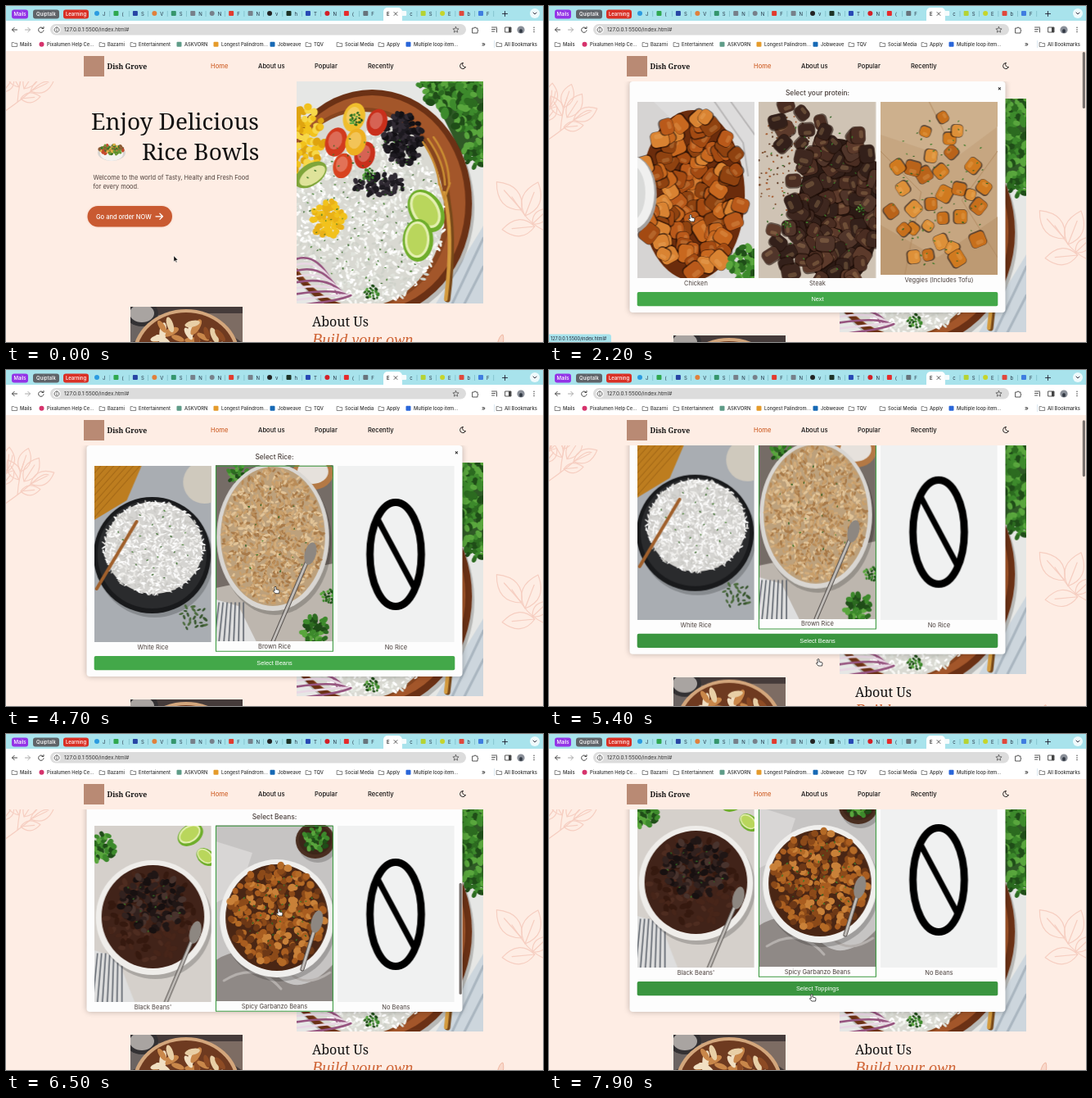
Animation of 656x410 px, one loop 8 s. Source, as an HTML page with a canvas:

```html
<!DOCTYPE html>
<html lang="en">
<head>
<meta charset="utf-8">
<title>Rice bowls</title>
<style>
html, body { margin: 0; width: 100%; height: 100%; overflow: hidden; background: #feede4 }
canvas { display: block; width: 656px; height: 410px }
</style>
</head>
<body>
<canvas id="stage"></canvas>
<script>
const W = 656, H = 410, LOOP = 8000, TAU = Math.PI * 2;
const dpr = window.devicePixelRatio || 1;
const SANS = 'Inter, sans-serif', SERIF = '"Noto Serif", serif';
const stage = document.getElementById('stage');
stage.width = W * dpr;
stage.height = H * dpr;
let g = stage.getContext('2d');

// ---- drawing helpers, all on the current context g ----
let seed = 1;
const rnd = () => (seed = seed * 16807 % 2147483647) / 2147483647;
const pick = list => list[Math.floor(rnd() * list.length)];

function rect(x, y, w, h, fill, r = 0) {
  g.fillStyle = fill;
  g.beginPath();
  g.roundRect(x, y, w, h, r);
  g.fill();
}
function oval(x, y, rx, ry, fill, turn = 0) {
  g.fillStyle = fill;
  g.beginPath();
  g.ellipse(x, y, rx, ry, turn, 0, TAU);
  g.fill();
}
function path(d, color, width, fill) {
  const p = new Path2D(d);
  if (fill) { g.fillStyle = fill; g.fill(p); }
  if (width) {
    g.strokeStyle = color;
    g.lineWidth = width;
    g.lineCap = g.lineJoin = 'round';
    g.stroke(p);
  }
}
function text(s, x, y, font, color = '#111', align = 'left') {
  g.font = font;
  g.fillStyle = color;
  g.textAlign = align;
  g.textBaseline = 'alphabetic';
  g.fillText(s, x, y);
}

// n bits spread evenly over an oval on a loose spiral; bits may be round or square
function strew(n, cx, cy, rx, ry, w, h, cols, square) {
  for (let i = 0; i < n; i++) {
    const a = i * 2.39996 + rnd() * .5, d = Math.sqrt((i + rnd()) / n), k = .8 + rnd() * .4;
    g.save();
    g.translate(cx + Math.cos(a) * d * rx, cy + Math.sin(a) * d * ry);
    g.rotate(rnd() * TAU);
    const col = pick(cols);
    if (square) {
      rect(-w * k - .8, -h * k - .4, w * k * 2 + 1.6, h * k * 2 + 2.2, '#1c0c0599', w * .6);
      rect(-w * k, -h * k, w * k * 2, h * k * 2, col, w * .55);
      rect(-w * k * .6, -h * k * .7, w * k, h * k * .6, '#ffd08a33', w * .3);
    } else oval(0, 0, w * k, h * k, col);
    g.restore();
  }
}
const herb = (x, y, r) => strew(r * 2, x, y, r, r, r * .24, r * .17, ['#3d8a2c', '#2c6b20', '#59a63d', '#1f4d18']);
const specks = (n, x, y, rx, ry) => strew(n, x, y, rx, ry, 1.3, .7, ['#3f7d2b', '#2f6322']);
function lime(x, y, r, turn) {
  oval(x, y, r, r * .72, '#6fae2b', turn);
  oval(x - 1, y - 1, r * .86, r * .58, '#e4efb0', turn);
  oval(x - 1, y - 1, r * .74, r * .46, '#b9d65c', turn);
}
function spoon(x, y, x2, y2) {
  path(`M${x} ${y}L${x2} ${y2}`, '#55504d', 5);
  path(`M${x} ${y}L${x2} ${y2}`, '#c3bfbb', 3);
  oval(x, y, 7, 14, '#8d8781', .25);
}
function napkin(y) {
  path(`M0 ${y}L28 ${y + 8}L50 216L0 216Z`, 0, 0, '#dedede');
  for (let i = 0; i < 9; i++) path(`M${i * 6 - 14} 216L${i * 5 - 6} ${y + 4}`, '#5d636c', 1.6);
}
function dish(x, y, rx, ry, rim, inner, edge) {
  oval(x + 3, y + 5, rx, ry, '#0003');
  oval(x, y, rx, ry, rim);
  oval(x, y - 1, rx - edge, ry - edge, inner);
}

// ---- pictures, painted once ----
function picture(w, h, bg, paint) {
  const c = document.createElement('canvas'), outer = g;
  c.width = Math.ceil(w * dpr);
  c.height = Math.ceil(h * dpr);
  g = c.getContext('2d');
  g.scale(dpr, dpr);
  seed = 4321;
  rect(0, 0, w, h, bg);
  paint();
  g = outer;
  return { c, w, h };
}
const put = (p, x, y) => g.drawImage(p.c, x, y, p.w, p.h);
const CW = 143.5, CH = 215;

const chicken = picture(CW, CH, '#d6d4d3', () => {
  path('M20 0L144 0L144 216L95 216L125 100Z', 0, 0, '#dddcdc');
  path('M95 0L130 50L136 90M115 0L144 40', '#b9b7b7', 2);
  oval(68, 114, 64, 104, '#6b2c0c');
  strew(95, 67, 112, 62, 99, 10, 8.5, ['#c8681f', '#a34a12', '#d98332', '#b9591a', '#8f4210'], true);
  oval(-6, 113, 30, 47, '#a5a2a0');
  oval(-7, 111, 28, 45, '#f0f0ef');
  oval(-9, 111, 19, 35, '#d9dad9');
  herb(135, 198, 22);
});
const steak = picture(CW, CH, '#cfc3b4', () => {
  strew(120, 35, 75, 45, 60, 1.2, 1, ['#7a4a2a', '#a4572a', '#5b3823']);
  const meat = ['#4a2d22', '#33201a', '#5c3a2b', '#3e271f', '#50352a'];
  strew(9, 48, 30, 36, 32, 10, 8, meat, true);
  oval(98, 135, 50, 90, '#2b1a14');
  strew(80, 96, 128, 60, 98, 10, 8.5, meat, true);
  strew(14, 45, 178, 38, 34, 10, 8, meat, true);
  specks(50, 72, 115, 70, 100);
  herb(125, 130, 5);
  herb(35, 150, 5);
});
const tofu = picture(CW, 211, '#c6a681', () => {
  path('M0 0L144 0L144 30L90 70L0 40Z', 0, 0, '#cdb08d');
  path('M0 150L70 190L144 140L144 211L0 211Z', 0, 0, '#bd9a73');
  path('M0 60L50 110L30 211M144 60L100 120L144 190M60 0L80 40', '#b28c63', 1);
  strew(31, 72, 112, 60, 98, 8, 7.4, ['#d07a1f', '#b9631a', '#dd9038', '#c76f1c'], true);
  specks(75, 72, 108, 62, 95);
});
const whiteRice = picture(CW, CH, '#a9adb2', () => {
  path('M0 0L58 0L40 42L0 66Z', 0, 0, '#bd7d1f');
  for (let i = 0; i < 8; i++) path(`M${i * 8} 0L0 ${i * 9}`, '#9b6214', 1);
  oval(135, 20, 26, 26, '#cfc9bd');
  dish(71, 109, 72, 71, '#191a1c', '#2a2b2d', 5);
  oval(73, 100, 60, 56, '#d5d4d1');
  strew(950, 73, 100, 62, 57, 2.7, .9, ['#fff', '#ecebe8', '#c9c8c4', '#f7f6f4']);
  specks(26, 74, 95, 48, 44);
  path('M3 150L52 68', '#a0602c', 4);
  strew(22, 122, 185, 18, 16, 3, 1.4, ['#4c6b3e', '#38562f']);
});
const brownRice = picture(CW, CH, '#756c66', () => {
  path('M0 150L144 120L144 216L0 216Z', 0, 0, '#bdb6ae');
  napkin(164);
  herb(28, 12, 13);
  oval(119, 10, 25, 20, '#b47945');
  oval(119, 8, 19, 15, '#e6e1dc');
  dish(70, 88, 69, 90, '#d9d6d2', '#bda17c', 5);
  strew(1000, 70, 87, 62, 82, 3.1, 1.4, ['#d2ac7b', '#b98c58', '#e2c498', '#c99f6b', '#a87a49']);
  specks(18, 70, 84, 48, 60);
  spoon(116, 108, 70, 215);
  herb(122, 201, 17);
  herb(138, 160, 9);
});
const blackBeans = picture(CW, CH, '#d5d0cb', () => {
  herb(8, 26, 18);
  lime(118, 11, 17, -.6);
  lime(137, 38, 13, .7);
  napkin(152);
  dish(72, 112, 70, 70, '#efedea', '#412319', 7);
  strew(110, 70, 110, 56, 54, 5, 3, ['#4e2c20', '#35190f', '#472519']);
  strew(100, 72, 94, 40, 36, 4.6, 3.4, ['#201615', '#32221f', '#171010', '#48332d']);
  specks(14, 68, 98, 38, 34);
  spoon(124, 130, 88, 215);
});
const garbanzo = picture(CW, CH, '#c6c4c3', () => {
  path('M0 165Q40 140 70 178T144 170L144 216L0 216Z', 0, 0, '#8f8986');
  path('M10 190Q50 165 80 200M90 180Q110 200 140 180', '#b5b0ad', 3);
  path('M0 20L45 34L30 80L0 95Z', 0, 0, '#d8d6d5');
  dish(122, 19, 24, 22, '#4a2e20', '#3c2619', 4);
  herb(122, 17, 15);
  dish(75, 114, 70, 72, '#f0efed', '#4a2614', 7);
  strew(230, 75, 110, 59, 61, 4.5, 4, ['#b46a26', '#8c4a19', '#c98139', '#6d3816', '#a95d20']);
  specks(45, 76, 105, 48, 45);
  spoon(124, 118, 106, 176);
});
const none = picture(CW, CH, '#f0f1f1', () => {
  g.strokeStyle = '#000';
  g.lineWidth = 9;
  g.beginPath();
  g.ellipse(71.5, 108, 31.5, 63.5, 0, 0, TAU);
  g.stroke();
  path('M50 66L94 148', '#000', 7);
});
const hero = picture(228, 285, '#e6e7e5', () => {
  path('M150 0L228 0L228 110L200 100Z', 0, 0, '#2f5a26');
  for (const [x, y, r] of [[185, 26, 28], [214, 60, 22], [218, 12, 20], [165, 18, 16], [220, 102, 17]]) herb(x, y, r);
  path('M228 190L170 285L228 285Z', 0, 0, '#cdd6dd');
  path('M228 205L190 285M228 240L205 285', '#aab6c0', 3);
  dish(92, 163, 122, 139, '#6b3115', '#a3562a', 8);
  oval(82, 168, 106, 122, '#87451f');
  oval(80, 170, 100, 119, '#d9d9d2');
  strew(1200, 88, 182, 92, 106, 3, 1.4, ['#fff', '#eef0ea', '#cfd2ca', '#f8f8f5', '#e0e3dc']);
  strew(75, 10, 88, 24, 45, 4.5, 4, ['#f2c21c', '#f7d84a', '#dfa40f']);
  strew(50, 38, 182, 20, 22, 4, 3.5, ['#f2c21c', '#e9b117']);
  oval(17, 128, 22, 13, '#7fa53a', -.6);
  oval(19, 129, 18, 9, '#dfe39a', -.6);
  strew(120, 130, 84, 24, 32, 4, 3.2, ['#1d1a20', '#302a33', '#121014']);
  strew(45, 100, 140, 32, 14, 4, 3, ['#1d1a20', '#302a33']);
  for (const [x, y, r, c] of [[98, 64, 14, '#c92f1b'], [48, 88, 15, '#d23a1e'], [83, 104, 14, '#c92f1b'], [56, 117, 13, '#d8431f'], [70, 58, 15, '#f0bd2c'], [72, 88, 14, '#eeb021']]) {
    oval(x, y, r * .88, r * 1.2, c, .3);
    oval(x - 1, y - 2, r * .55, r * .75, '#ffffff40', .3);
  }
  specks(130, 90, 170, 85, 95);
  herb(72, 60, 8);
  herb(88, 128, 8);
  herb(92, 272, 9);
  lime(158, 172, 28, 1);
  lime(148, 208, 26, 1.6);
  for (let i = 0; i < 9; i++) path(`M-4 ${232 + i * 7}Q${28 + i * 3} ${218 + i * 8} ${50 + i * 2} 275`, i % 2 ? '#e9d7e4' : '#96547f', 2.6);
  path('M182 150Q194 200 184 280', '#77481a', 7);
  path('M180 150Q192 200 182 280', '#d39a3e', 4.5);
  path('M154 88Q172 115 174 140M160 84Q180 112 181 140M167 82Q187 110 186 142M174 138L180 158L187 138', '#c98c32', 2.6);
});
const card = picture(137, 60, '#453b3a', () => {
  path('M0 10L60 10L10 40L0 44Z', 0, 0, '#6b6462');
  oval(14, 8, 20, 16, '#333133');
  oval(14, 8, 15, 11, '#a9a4a1');
  path('M85 8L137 8L137 44Z', 0, 0, '#7d6c63');
  dish(68, 62, 66, 59, '#d3a67c', '#6e3a20', 5);
  strew(70, 68, 62, 54, 46, 10, 4, ['#c9874a', '#e8cfa6', '#8d4b24', '#f1dfc2']);
});
const salad = picture(36, 26, '#feede4', () => {
  oval(18, 14, 17, 10, '#d8d5d2');
  oval(18, 15, 14, 9, '#f4f2f0');
  strew(75, 18, 10, 15, 6, 2, 1.6, ['#6b9a35', '#3f7427', '#c4492d', '#e3b04a', '#8c5a35']);
});

// ---- browser window ----
function tabs() {
  rect(0, 0, W, 18, '#a8e3ec');
  [['Mails', 7, 20, '#9334e6'], ['Quiptalk', 33, 32, '#5f6368'], ['Learning', 70, 31, '#d93025']].forEach(([s, x, w, c]) => {
    rect(x, 4.5, w, 11, c, 3);
    text(s, x + w / 2, 12.2, `500 6px ${SANS}`, '#fff', 'center');
  });
  const icons = ['#2c9be0', '#2fa84f', '#2745a5', '#e0813c', '#35966d', '#77808a', '#77808a', '#e23b2e', '#77808a', '#222', '#1d3326', '#2748b5', '#d31f26', '#e62b2b', '#68747c', '', '#f4fbfc', '#b5d334', '#c6d52b', '#e0483c', '#3f7de0'];
  [...'J(SVSNNFNvhTN(FEcSEbF'].forEach((s, i) => {
    const x = 108 + i * 23.45;
    if (!icons[i]) {
      rect(461, 2, 23, 17, '#fff', [5, 5, 0, 0]);
      text('E', 465, 11.5, `500 6px ${SANS}`);
      path('M474 7.5l4 4m0-4l-4 4', '#333', .8);
      return;
    }
    rect(x, 6, 6, 6, icons[i], i % 3 ? 1 : 3);
    text(s, x + 10, 11.5, `6px ${SANS}`, '#234');
    if (i != 14) rect(x + 18.5, 6, .6, 7, '#6fb0bc');
  });
  path('M606.5 9.5h6m-3-3v6', '#223', .9);
  oval(646, 9, 6, 6, '#eefafc');
  path('M644 8l2 2l2-2', '#223', .9);
}
function toolbar() {
  rect(0, 18, W, 37, '#fff');
  path('M13.5 29h-6m2.7-2.7l-2.7 2.7l2.7 2.7', '#444', 1);
  path('M23.5 29h6m-2.7-2.7l2.7 2.7l-2.7 2.7', '#aaa', 1);
  path('M45.4 27.2a3.2 3.2 0 1 0 .6 2.6M46 25.5v2h-2', '#444', 1);
  rect(54, 22, 508, 13.5, '#dcdcdc', 7);
  oval(62, 29, 5, 5, '#f6f6f6');
  path('M62 26a3 3 0 1 0 .01 0M62 29v1.5M62 27.4v.1', '#444', .8);
  text('127.0.0.1:5500/index.html#', 71, 31.3, `6.4px ${SANS}`, '#333');
  path('M549.5 25.4l1 2.3 2.6.2-2 1.7.6 2.5-2.2-1.3-2.2 1.3.6-2.5-2-1.7 2.6-.2z', '#444', .7);
  path('M570 27h2q1-2.6 2 0h2v2q2 1 0 2v2h-6z', '#444', .9);
  path('M593.5 26h6m-6 2.5h4m-4 2.5h3m3 1v-5', '#444', .9);
  path('M610 26h7v6h-7z', '#444', .9);
  rect(614, 26, 3, 6, '#444');
  oval(629, 29, 4.6, 4.6, '#8a8f98');
  oval(629, 30.5, 2, 2.5, '#333a44');
  for (let y = 26.3; y < 33; y += 2.6) oval(645, y, .75, .75, '#444');

  [['Mails', 17], ['Pixalumen Help Ce...', 50, '#d6336c'], ['Bazarni', 124], ['Entertainment', 162], ['ASKVORN', 218, '#5f9c88'],
   ['Longest Palindrom...', 263, '#e59b2c'], ['Jobweave', 332, '#1769b5'], ['TQV', 376], ['Social Media', 414], ['Apply', 465],
   ['Multiple loop item...', 498, '#2a66d9'], ['All Bookmarks', 609]].forEach(([s, x, c]) => {
    if (c) rect(x - 9.5, 43.8, 6, 6, c, c == '#d6336c' ? 3 : 1);
    else path(`M${x - 9.5} 44.6h2.3l.8.9h3v4h-6.1z`, '#555', .7);
    text(s, x, 49.1, `500 5.8px ${SANS}`, '#333');
  });
  text('»', 581, 49, `500 8px ${SANS}`, '#333');
  rect(596, 42, .6, 9, '#c5d8e8');
}
function nav() {
  rect(0, 55, W, 37, '#feede4');
  rect(95, 61, 25, 25, '#b98a74');
  text('Dish Grove', 123.5, 76.5, `600 8.7px ${SERIF}`);
  ['Home', 'About us', 'Popular', 'Recently'].forEach((s, i) =>
    text(s, [250, 308, 377, 442][i], 76, `500 7.6px ${SANS}`, i ? '#111' : '#d0652f'));
  path('M558 69.5a3.6 3.6 0 1 0 3.5 5a3.4 3.4 0 0 1-3.5-5z', '#111', .9);
}

// ---- page, in coordinates of the unscrolled document ----
function leaf(x, y, angle, len) {
  g.save();
  g.translate(x, y);
  g.rotate(angle);
  path(`M0 0Q${len * .45} ${-len * .5} ${len} 0Q${len * .45} ${len * .5} 0 0M0 0L${len * .7} 0`, '#f6cec1', 1.2);
  g.restore();
}
function page() {
  path('M-2 164Q22 147 34 136T52 128M14 152Q16 128 22 112M-2 128Q6 118 8 104', '#f6cec1', 1.2);
  [[30, 139, -.45, 32], [18, 148, -.1, 24], [22, 136, -1, 34], [18, 124, -1.25, 30], [16, 134, -2.1, 28], [2, 124, -1.5, 30], [-4, 140, -.9, 22]].forEach(a => leaf(...a));
  path('M658 309Q642 302 632 288L618 268', '#f6cec1', 1.2);
  [[630, 284, -2.3, 46], [634, 291, -1.2, 44], [646, 304, 3.05, 40], [643, 301, -.75, 28]].forEach(a => leaf(...a));
  path('M600 448Q603 436 607 436Q609 442 606 452', '#f0b9a4', 1, '#f9d8ca');

  text('Enjoy Delicious', 104, 186, `28px ${SERIF}`);
  put(salad, 111, 200);
  text('Rice Bowls', 166, 223, `28px ${SERIF}`);
  text('Welcome to the world of Tasty, Healty and Fresh Food', 106.5, 247, `7.45px ${SANS}`, '#4d403b');
  text('for every mood.', 106.5, 258, `7.45px ${SANS}`, '#4d403b');
  g.save();
  g.shadowColor = '#c95a3133';
  g.shadowBlur = 3 * dpr;
  rect(99.5, 279, 103.5, 25.5, '#c95a31', 13);
  g.restore();
  text('Go and order NOW', 110, 294.5, `500 7.5px ${SANS}`, '#fff');
  path('M183 291.8h8.5m-3.6-3.6l3.6 3.6l-3.6 3.6', '#fff', 1.3);
  put(hero, 355.3, 113);
  put(card, 152, 402);
  text('About Us', 374, 426, `500 16px ${SERIF}`);
  text('Build your own', 374, 449, 'italic 20px "Liberation Serif", serif', '#cf6334');
}

// ---- dialog ----
const STEPS = [
  { title: 'Select your protein:', names: ['Chicken', 'Steak', 'Veggies (Includes Tofu)'], pics: [chicken, steak, tofu], next: 'Next', sel: 0, at: 2850 },
  { title: 'Select Rice:', names: ['White Rice', 'Brown Rice', 'No Rice'], pics: [whiteRice, brownRice, none], next: 'Select Beans', sel: 1, at: 4450 },
  { title: 'Select Beans:', names: ["Black Beans'", 'Spicy Garbanzo Beans', 'No Beans'], pics: [blackBeans, garbanzo, none], next: 'Select Toppings', sel: 1, at: 6250 }
];
function step(s, y, t, hover) {
  text(s.title, 328, y + 17, `500 8.4px ${SANS}`, '#4a3f3b', 'center');
  s.names.forEach((name, i) => {
    const x = 107.7 + i * 148.5, on = i == s.sel && t >= s.at, p = s.pics[i];
    put(p, x, y + 25 - on);
    text(name, x + CW / 2, y + 33.8 + p.h - on * 1.2, `7.5px ${SANS}`, '#4a3f3b', 'center');
    if (on) {
      g.strokeStyle = '#3c9a41';
      g.lineWidth = 1.1;
      g.strokeRect(x + .3, y + 25.2, CW - .6, 226);
    }
  });
  rect(107.7, y + 257, 440.6, 17.3, hover ? '#3a953f' : '#43a849', 2);
  text(s.next, 328, y + 268.3, '7.4px "Liberation Sans", Arial, sans-serif', '#fff', 'center');
}
function dialog(t, top, inner) {
  g.save();
  g.shadowColor = '#0004';
  g.shadowBlur = 7 * dpr;
  rect(98.5, top, 459, 282, '#fdfdfd', 4);
  g.restore();
  g.save();
  g.beginPath();
  g.rect(98.5, top, 459, 282);
  g.clip();
  const hover = within(t, 3450, 4050) || within(t, 5000, 5500) || t > 7150;
  step(STEPS[t < 3900 ? 0 : 1], top - inner, t, hover);
  if (t >= 5150) step(STEPS[2], top - inner + 290, t, hover);
  text('×', 550.5, top - inner + 10.8, `700 7px ${SANS}`, '#222', 'center');
  g.restore();
  if (t > 5400) bar(553.6, top + inner * .48, 136, at(t, [[5400, 0], [5480, 1], [6600, 1], [6850, 0]])[0]);
}

// ---- motion ----
const within = (t, a, b) => t >= a && t < b;
// eased values between keys [time, ...values]
function at(t, keys) {
  let i = 0;
  while (i < keys.length - 1 && t >= keys[i + 1][0]) i++;
  const a = keys[i], b = keys[i + 1] || a;
  const u = b == a ? 0 : Math.max(0, (t - a[0]) / (b[0] - a[0])), e = u * u * (3 - 2 * u);
  return a.slice(1).map((v, k) => v + (b[k + 1] - v) * e);
}
const MOUSE = [[0, 205, 305], [100, 205, 305], [650, 181, 257], [1000, 184, 256], [1300, 195.5, 237], [1700, 173, 255],
  [2900, 173, 255], [3600, 236, 357], [3950, 236, 357], [4400, 329, 240], [4550, 329, 240], [5050, 329, 353],
  [5700, 329, 353], [6150, 333, 214], [6700, 333, 214], [7250, 321, 318], [8000, 321, 318]];

function bar(x, y, h, alpha) {
  g.globalAlpha = alpha;
  rect(x, y, 3.2, h, '#77706d', 1.6);
  g.globalAlpha = 1;
}
function mouse(t) {
  const [x, y] = at(t, MOUSE);
  g.save();
  g.translate(x, y);
  if (within(t, 480, 1180) || t > 1580)
    path('M-1 0q1-1 2 0v3l3 .6q1 .3 1 1.4l-.5 3h-4.5l-2.6-3q0-1.2 1.6-.6z', '#222', .8, '#fff');
  else path('M0 0v7l1.7-1.5 1.2 2.5 1-.5-1.2-2.4h2.2z', '#fff', .4, '#111');
  g.restore();
}

function draw(now) {
  const t = now % LOOP;
  g.setTransform(dpr, 0, 0, dpr, 0, 0);
  rect(0, 0, W, H, '#feede4');
  const open = t >= 1850;
  const scroll = open ? at(t, [[5220, 0], [5480, 35]])[0] : 35;
  const inner = at(t, [[5480, 0], [6050, 260], [6600, 260], [7100, 302]])[0];
  g.save();
  g.translate(0, -scroll);
  page();
  g.restore();
  if (open) dialog(t, 92 - scroll, inner);
  nav();
  toolbar();
  tabs();
  if (open) bar(651.8, 56 + scroll * .19, 69, at(t, [[1850, 1], [2800, 1], [3050, 0], [5200, 0], [5280, 1], [5650, 1], [5900, 0]])[0]);
  if (within(t, 480, 2500)) {
    rect(-3, 400.5, 79, 13, '#a8e3ec', 3);
    text('127.0.0.1:5500/index.html#', 2, 407.6, `5.5px ${SANS}`, '#223');
  }
  mouse(t);
}
const start = performance.now();
(function tick() {
  draw(performance.now() - start);
  requestAnimationFrame(tick);
})();
</script>
</body>
</html>
```
